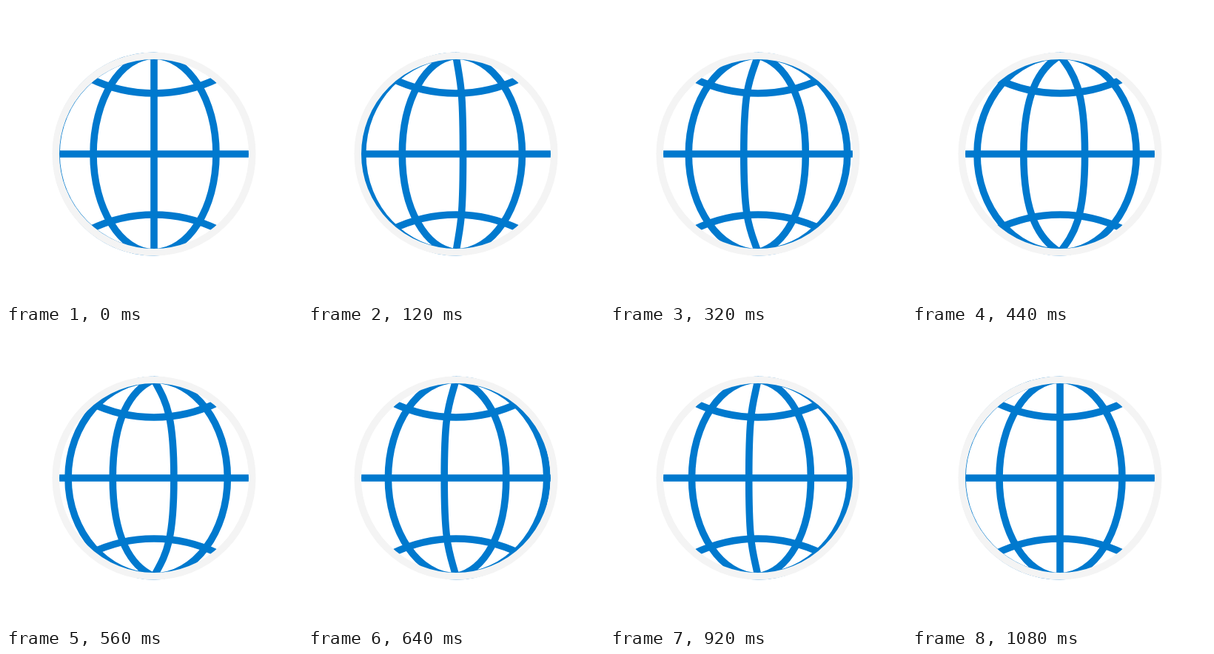
Write an HTML page that moves like this. It is 400x400 px and loops after 1.2 s.

```html
<!DOCTYPE html>
<html lang="en">
<head>
<meta charset="utf-8">
<title>Spinning globe</title>
<style>
  html, body { margin: 0; width: 100%; height: 100%; overflow: hidden; background: #fff; }
  svg { display: block; width: 100%; height: 100%; }
</style>
</head>
<body>
<svg viewBox="-200 -200 400 400">
  <g fill="none" stroke="#0079ce" stroke-width="9.6">
    <path d="M-137 0H137"/>
    <path d="M-86 -101.9A196 196 0 0 0 86 -101.9"/>
    <path d="M-86 101.9A196 196 0 0 1 86 101.9"/>
    <path id="meridians" stroke-linecap="round"/>
  </g>
  <circle r="132.8" fill="none" stroke="#f4f4f4" stroke-width="9.6"/>
</svg>
<script>
  const LOOP = 1200, STEP = 40, SPIN_END = 1080;
  const RADIUS = 132.8, KAPPA = 0.5523;
  const meridians = document.getElementById('meridians');

  const lerp = (a, b, k) => a + (b - a) * k;

  // Half of a meridian: an elliptic arc, or a straight line in the middle.
  const arc = x => [x * KAPPA, RADIUS, x, RADIUS * KAPPA, x];
  const line = [0, 92, 0, 98, 0];
  const stops = [arc(-132), arc(-82), line, arc(84), arc(132)];

  function meridian(u) {
    const i = Math.min(3, Math.floor(u));
    const [ax, ay, bx, by, x] = stops[i].map((v, n) => lerp(v, stops[i + 1][n], u - i));
    return `M0 ${-RADIUS}C${ax} ${-ay} ${bx} ${-by} ${x} 0` +
           `C${bx} ${by} ${ax} ${ay} 0 ${RADIUS}`;
  }

  function hermite(k, from, to, slopeFrom, slopeTo) {
    const j = 1 - k;
    return from * j * j * (1 + 2 * k) + to * k * k * (3 - 2 * k) +
           slopeFrom * k * j * j - slopeTo * k * k * j;
  }

  // Distance turned, in meridian spacings: speed up, rush, slow down to 4.
  function turned(t) {
    if (t < 440) return 8.13e-6 * t * t - 2.04e-9 * t ** 3;
    if (t < 560) return hermite((t - 440) / 120, 1.4, 2.32, 0.72, 0.79);
    const left = Math.max(0, SPIN_END - t) / (SPIN_END - 560);
    return 4 - 1.68 * left ** 2.05;
  }

  function draw(time) {
    const t = Math.floor((time % LOOP) / STEP) * STEP;
    const shift = turned(t) % 1;
    meridians.setAttribute('d', [0, 1, 2, 3].map(i => meridian(i + shift)).join(''));
  }

  const start = performance.now();
  function tick() {
    draw(performance.now() - start);
    requestAnimationFrame(tick);
  }
  tick();
</script>
</body>
</html>
```
